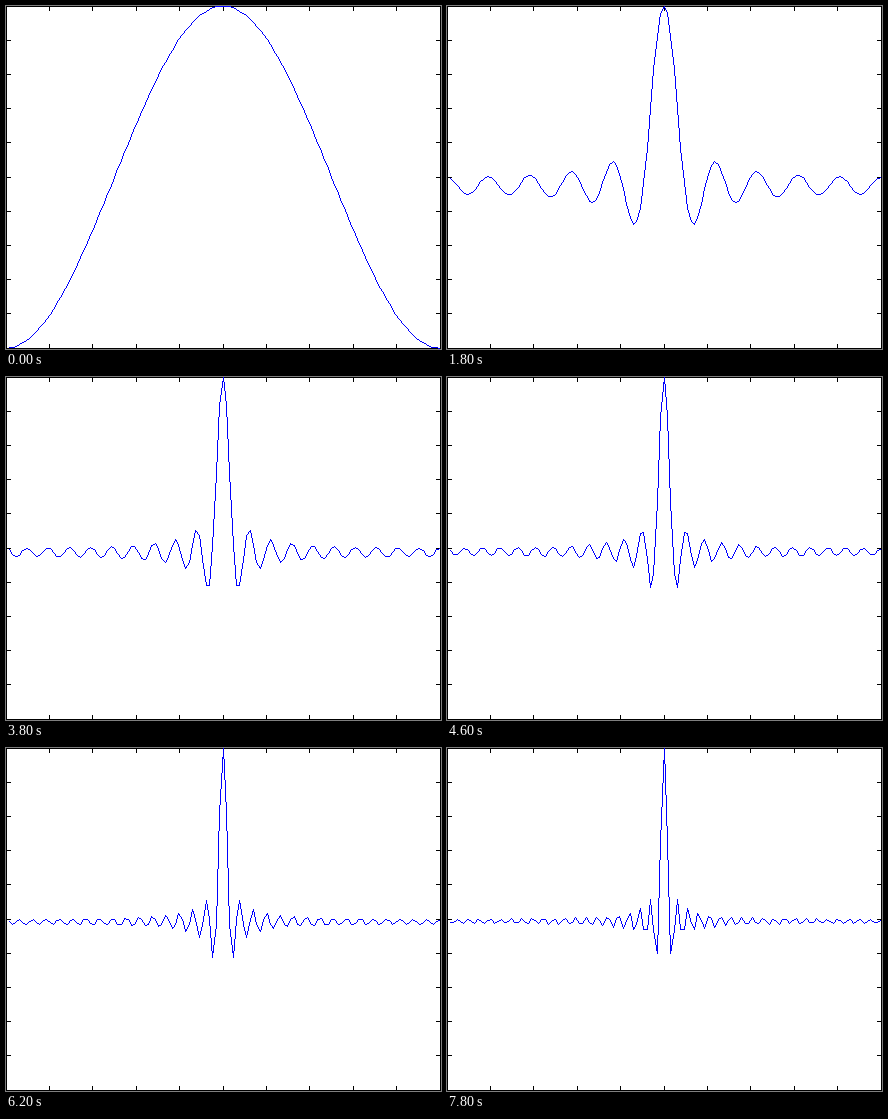
These frames come from a looping animation (435 px wide and 343 px high, 8000 ms). An HTML page with a canvas:

```html
<!DOCTYPE html>
<html lang="en">
<head>
<meta charset="utf-8">
<title>Cosine sum</title>
<style>
  html, body { margin: 0; width: 100%; height: 100%; overflow: hidden; background: #fff; }
  canvas { display: block; width: 100vw; height: 100vh; image-rendering: pixelated; }
</style>
</head>
<body>
<canvas id="plot" width="435" height="343"></canvas>
<script>
const ctx = document.getElementById('plot').getContext('2d');
const RIGHT = 434, BOTTOM = 342, TICK = 5;
const STEP_MS = 200, STEPS = 40;
const HALF = 64; // samples per half axis

// Mean of cos(kx) for k = 1..n
function meanCosine(n, x) {
  let sum = 0;
  for (let k = 1; k <= n; k++) sum += Math.cos(k * x);
  return sum / n;
}

// Crisp one-pixel line that leaves out its end point
function pixelLine(x0, y0, x1, y1) {
  const dx = x1 - x0, dy = y1 - y0;
  const length = Math.max(Math.abs(dx), Math.abs(dy));
  for (let i = 0; i < length; i++) {
    ctx.fillRect(Math.round(x0 + dx * i / length), Math.round(y0 + dy * i / length), 1, 1);
  }
}

function drawAxes() {
  ctx.fillStyle = '#000';
  ctx.fillRect(0, 0, RIGHT + 1, 1);
  ctx.fillRect(0, BOTTOM, RIGHT + 1, 1);
  ctx.fillRect(0, 0, 1, BOTTOM + 1);
  ctx.fillRect(RIGHT, 0, 1, BOTTOM + 1);
  for (let i = 1; i < 10; i++) {
    const x = Math.floor(RIGHT * i / 10);
    const y = Math.floor(BOTTOM * i / 10);
    ctx.fillRect(x, 0, 1, TICK);
    ctx.fillRect(x, BOTTOM + 1 - TICK, 1, TICK);
    ctx.fillRect(0, y, TICK, 1);
    ctx.fillRect(RIGHT + 1 - TICK, y, TICK, 1);
  }
}

function drawCurve(n) {
  const point = j => [
    Math.floor(RIGHT / 2 * (1 + j / HALF)),
    Math.floor(BOTTOM / 2 * (1 - meanCosine(n, Math.PI * j / HALF)) + 1e-6)
  ];
  ctx.fillStyle = '#00f';
  let from = point(1 - HALF);
  for (let j = 2 - HALF; j <= HALF; j++) {
    const to = point(j);
    pixelLine(...from, ...to);
    from = to;
  }
}

let shown = 0;
function render(n) {
  if (n === shown) return;
  shown = n;
  ctx.fillStyle = '#fff';
  ctx.fillRect(0, 0, RIGHT + 1, BOTTOM + 1);
  drawAxes();
  drawCurve(n);
}

let start;
function tick(now) {
  start ??= now;
  render(1 + Math.floor((now - start) / STEP_MS) % STEPS);
  requestAnimationFrame(tick);
}
render(1);
requestAnimationFrame(tick);
</script>
</body>
</html>
```
